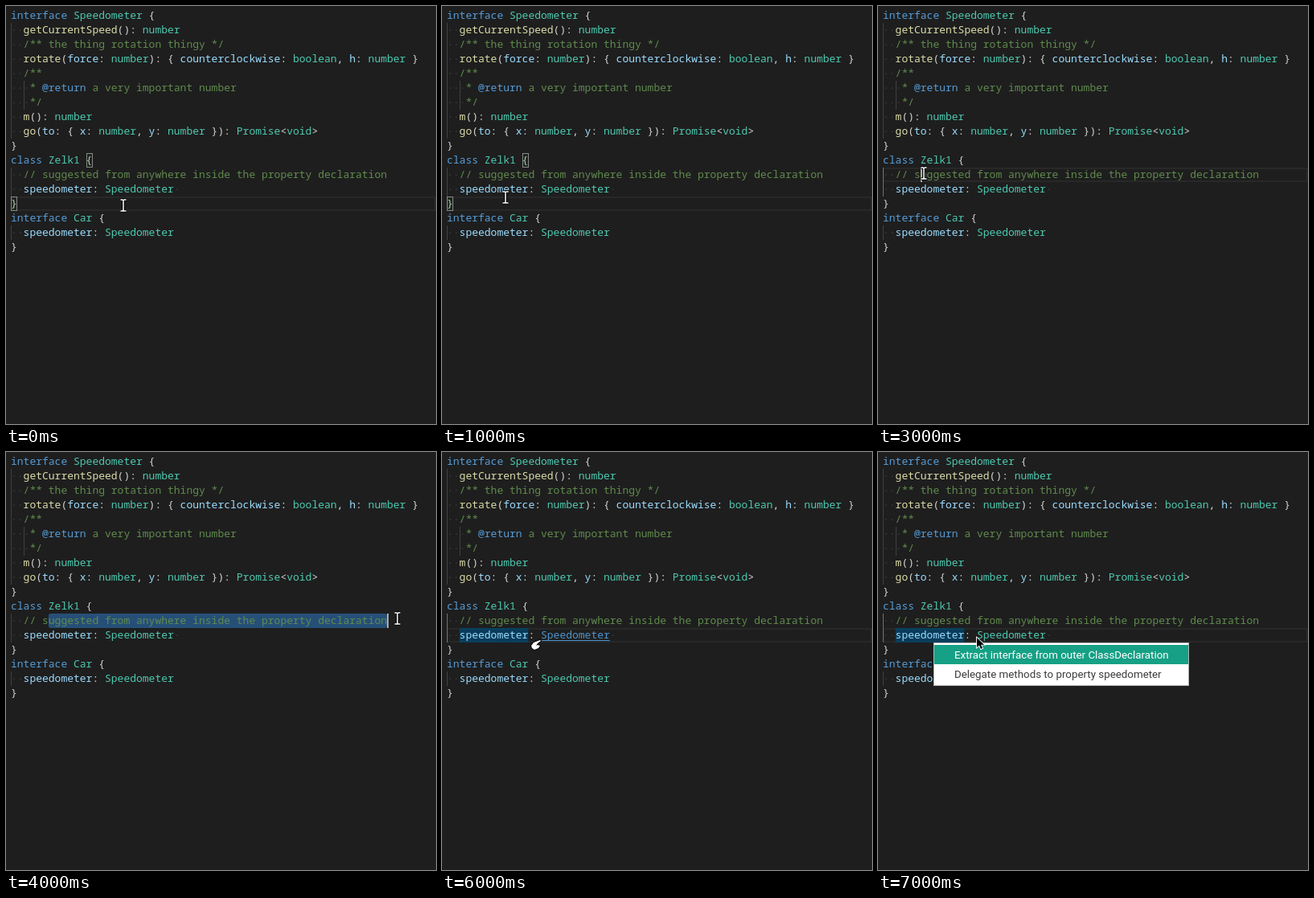
An HTML page with a canvas that plays this animation: 535 by 520 pixels, repeating every 8000 ms.

```html
<!DOCTYPE html>
<html lang="en">
<head>
<meta charset="utf-8">
<title>Code editor</title>
<style>
  html, body { margin: 0; overflow: hidden; background: #1e1e1e; }
  canvas { display: block; }
</style>
</head>
<body>
<canvas id="stage" width="535" height="520"></canvas>
<script>
const ctx = document.getElementById('stage').getContext('2d');
const LEFT = 6, TOP = 3, CHAR = 7.8, ROW = 18;
const COLOR = {
  keyword: '#569cd6', type: '#4ec9b0', call: '#dcdcaa', name: '#9cdcfe',
  plain: '#d4d4d4', comment: '#608b4e', link: '#4e94ce'
};
const lines = `interface Speedometer {
  getCurrentSpeed(): number
  /** the thing rotation thingy */
  rotate(force: number): { counterclockwise: boolean, h: number }
  /**
   * @return a very important number
   */
  m(): number
  go(to: { x: number, y: number }): Promise<void>
}
class Zelk1 {
  // suggested from anywhere inside the property declaration
  speedometer: Speedometer 
}
interface Car {
  speedometer: Speedometer
}`.split('\n');

// One scene per second; line = current row, caret and select are [row, column, ...].
const scenes = [
  { mouse: ['beam', 146, 248], line: 13, brackets: true },
  { mouse: ['beam', 79, 238], line: 13, brackets: true },
  { mouse: ['beam', 161, 183], word: true, matches: 'd', select: [12, 6, 7], caret: [12, 7] },
  { mouse: ['beam', 57, 208], line: 11, caret: [11, 6], activeGuide: true },
  { mouse: ['beam', 487, 207], select: [11, 6, 60], caret: [11, 60] },
  { mouse: ['beam', 107, 239], line: 13, brackets: true, caret: [13, 1] },
  { mouse: ['hand', 117, 240], line: 12, word: true, link: true, activeGuide: true },
  { mouse: ['arrow', 123, 231], line: 12, word: true, menu: true, activeGuide: true }
];

const colX = col => LEFT + col * CHAR;
const rowY = row => TOP + row * ROW;

function rect(color, x, y, w, h) {
  ctx.fillStyle = color;
  ctx.fillRect(x, y, w, h);
}

function mark(color, row, from, to, radius = 0) {
  ctx.fillStyle = color;
  ctx.beginPath();
  ctx.roundRect(colX(from), rowY(row), (to - from) * CHAR, ROW, radius);
  ctx.fill();
}

function write(text, row, col, color) {
  ctx.fillStyle = color;
  ctx.fillText(text, colX(col), rowY(row) + 13);
}

function tokenColor(token, rest) {
  if (/^(interface|class)$/.test(token)) return COLOR.keyword;
  if (/^([A-Z]\w*|number|boolean|void)$/.test(token)) return COLOR.type;
  if (!/\w/.test(token)) return COLOR.plain;
  return rest[0] === '(' ? COLOR.call : COLOR.name;
}

function drawLine(text, row, linked) {
  const indent = text.search(/\S/);
  for (let col = 0; col < text.length; col++) {
    if (col < indent || col >= text.trimEnd().length) write('·', row, col, 'rgba(227,228,226,.16)');
  }
  const comment = /^\s*(\/|\*)/.test(text);
  for (const { 0: token, index } of text.matchAll(comment ? /@?\w+|[^\s\w@]+/g : /\w+|[^\s\w]+/g)) {
    let color = comment ? COLOR.comment : tokenColor(token, text.slice(index + token.length));
    if (token[0] === '@') color = COLOR.keyword;
    if (linked && color === COLOR.type) {
      color = COLOR.link;
      rect(color, colX(index), rowY(row) + 15, token.length * CHAR, 1);
    }
    write(token, row, index, color);
  }
}

function drawGuides(active) {
  const guide = (col, row, count, color = '#404040') =>
    rect(color, Math.round(colX(col)), rowY(row), 1, count * ROW);
  guide(0, 1, 8);
  guide(2, 5, 2);
  guide(0, 11, 2, active ? '#707070' : undefined);
  guide(0, 15, 1);
}

function drawBracket(row, col) {
  const x = Math.round(colX(col));
  rect('rgba(0,100,0,.1)', x, rowY(row), 8, ROW);
  ctx.strokeStyle = '#888';
  ctx.lineWidth = 1;
  ctx.strokeRect(x + .5, rowY(row) + .5, 7, ROW - 1);
}

function drawMenu() {
  rect('#b5b5b5', 69, 237, 318, 54);
  rect('#fff', 70, 238, 316, 52);
  rect('#16a085', 70, 240, 316, 24);
  ctx.font = '13.333px Roboto, sans-serif';
  ctx.fillStyle = '#fff';
  ctx.fillText('Extract interface from outer ClassDeclaration', 95, 257);
  ctx.fillStyle = '#3b3b3b';
  ctx.fillText('Delegate methods to property speedometer', 95, 281);
}

const pointers = {
  beam: new Path2D('M-3.5-7H-1.5Q0-7 0-5.5Q0-7 1.5-7H3.5M0-5.5V5.5M-3.5 7H-1.5Q0 7 0 5.5Q0 7 1.5 7H3.5'),
  hand: new Path2D('M5-6L-3-3L-6 1L-5 4L-2 6L3 4L5 1L2 0L0 1L2-2L6-5Z'),
  arrow: new Path2D('M0 0V12L3 9.5L5 14L7 13L5 8.7H9Z')
};

function drawMouse(kind, x, y) {
  const path = pointers[kind];
  const stroke = (color, width) => {
    ctx.strokeStyle = color;
    ctx.lineWidth = width;
    ctx.stroke(path);
  };
  ctx.save();
  ctx.translate(x, y);
  if (kind === 'beam') {
    stroke('#000', 3.5);
    stroke('#fff', 1.5);
  } else {
    const [fill, edge] = kind === 'hand' ? ['#fff', '#000'] : ['#000', '#fff'];
    stroke(edge, 1.8);
    ctx.fillStyle = fill;
    ctx.fill(path);
  }
  ctx.restore();
}

function draw(scene) {
  rect('#1e1e1e', 0, 0, 535, 520);
  ctx.font = '13px "Noto Sans Mono", monospace';
  if (scene.line) {
    ctx.strokeStyle = '#282828';
    ctx.lineWidth = 2;
    ctx.strokeRect(LEFT + 1, rowY(scene.line) + 1, 527, ROW - 2);
  }
  if (scene.select) mark('#264f78', ...scene.select, 3);
  if (scene.word) mark('rgba(0,73,114,.72)', 12, 2, 13);
  drawGuides(scene.activeGuide);
  lines.forEach((text, row) => {
    [...text].forEach((char, col) => {
      const selected = scene.select && row === scene.select[0] && col === scene.select[1];
      if (char === scene.matches && !selected) mark('rgba(173,214,255,.15)', row, col, col + 1);
    });
    drawLine(text, row, scene.link && row === 12);
  });
  if (scene.brackets) {
    drawBracket(10, 12);
    drawBracket(13, 0);
  }
  if (scene.caret) {
    const [row, col] = scene.caret;
    rect('#aeafad', Math.round(colX(col)), rowY(row), 2, ROW);
  }
  if (scene.menu) drawMenu();
  drawMouse(...scene.mouse);
}

function tick() {
  draw(scenes[Math.floor(performance.now() % 8000 / 1000)]);
  requestAnimationFrame(tick);
}
tick();
</script>
</body>
</html>
```
